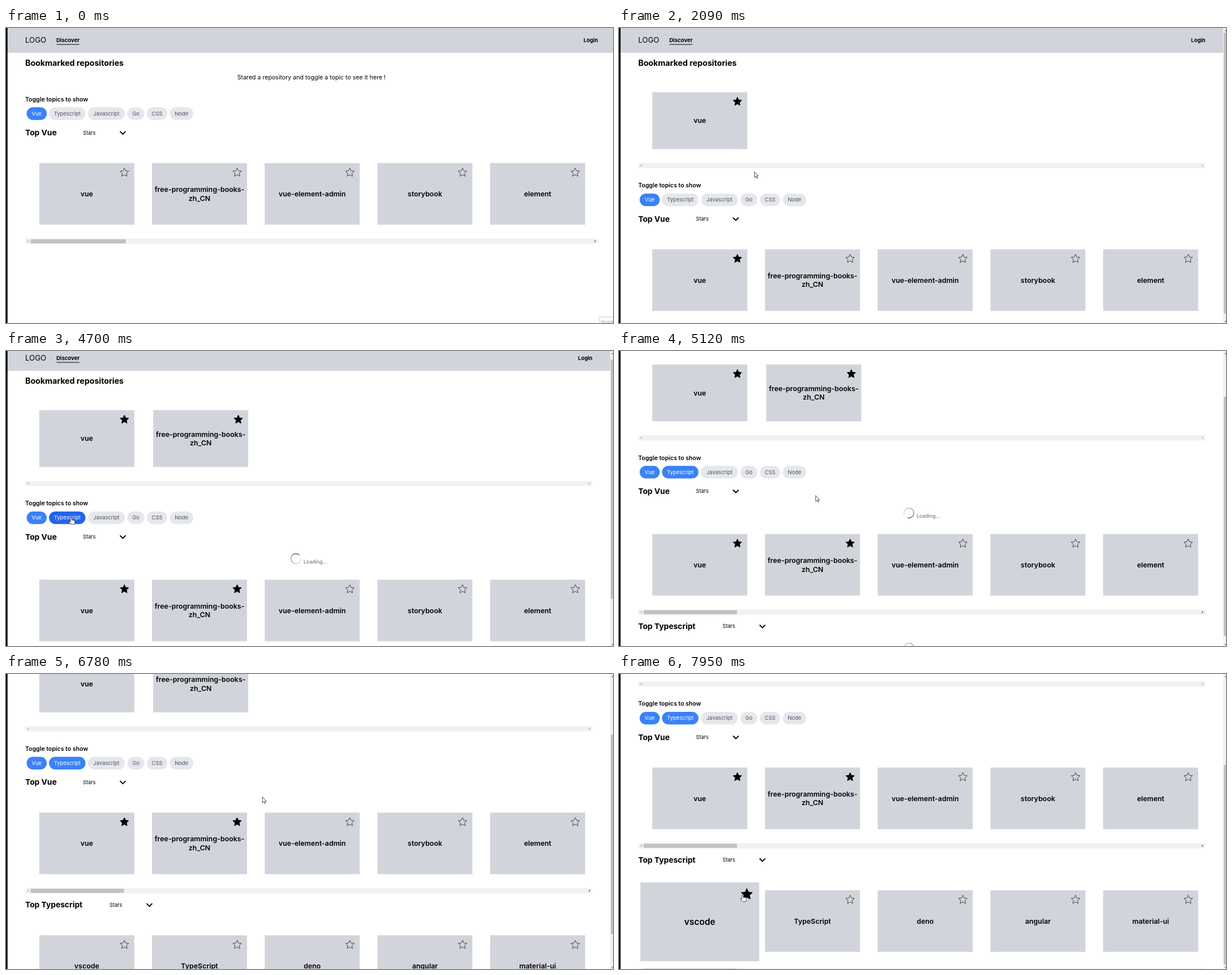
Recreate the animation shown at these times as an HTML page. Size 1073 px wide and 522 px high, loop 8000 ms.

```html
<!DOCTYPE html>
<html lang="en">
<head>
<meta charset="utf-8">
<title>Bookmarked repositories</title>
<style>
  html, body { margin: 0; width: 100%; height: 100%; overflow: hidden; background: #fff; }
  svg { display: block; width: 1073px; height: 522px; font-family: Inter, "Open Sans", sans-serif; }
</style>
</head>
<body>
<svg id="stage" viewBox="0 0 1073 522" xmlns="http://www.w3.org/2000/svg"></svg>
<script>
const LOOP = 8000;
const VIEW = 522;
const stage = document.getElementById('stage');

// Moments at which the page changes state
const STAR_VUE = 1830, STAR_BOOKS = 2860, PICK_TOPIC = 4630, LOADED = 6310, STAR_CODE = 7680;

const SCROLL = [[3560, 0], [3700, 9], [4930, 9], [5150, 102], [6650, 102], [6780, 146], [6990, 226]];
const POINTER = [
  [330, 652, 508], [600, 540, 400], [850, 400, 262], [970, 328, 178], [1080, 301, 185],
  [1140, 290, 203], [1210, 271, 226], [1350, 271, 226], [1520, 225, 246], [1650, 216, 252],
  [1850, 222, 251], [2090, 239, 254], [2160, 239, 254], [2400, 330, 330], [2600, 395, 392],
  [2800, 412, 396], [2990, 412, 395], [3060, 418, 396], [3200, 418, 396], [3330, 405, 320],
  [3470, 381, 205], [3600, 330, 232], [3900, 130, 290], [4020, 113, 294], [4700, 113, 294],
  [5000, 300, 270], [5400, 456, 222], [5890, 456, 222], [6240, 453, 217], [6780, 453, 217],
  [7000, 400, 260], [7250, 260, 370], [7480, 212, 388], [7560, 212, 388], [7750, 208, 392], [7950, 217, 390]
];
const HAND_TIMES = [[820, 940], [1520, STAR_VUE], [2580, 3260], [3440, 3540], [4000, 4850], [7210, LOOP]];

const VUE_REPOS = [['vue'], ['free-programming-books-', 'zh_CN'], ['vue-element-admin'], ['storybook'], ['element']];
const TS_REPOS = [['vscode'], ['TypeScript'], ['deno'], ['angular'], ['material-ui']];
const TOPICS = [['Vue', 36.5, 35.5], ['Typescript', 76, 64.5], ['Javascript', 145, 65],
  ['Go', 214.5, 30], ['CSS', 249, 36], ['Node', 289.5, 41.5]];

const clamp = v => Math.max(0, Math.min(1, v));
const ease = v => { v = clamp(v); return v * v * (3 - 2 * v); };

// Linear interpolation through [time, ...values]
function track(keys, t) {
  const i = keys.findIndex(k => k[0] > t);
  if (i === 0) return keys[0].slice(1);
  if (i < 0) return keys[keys.length - 1].slice(1);
  const a = keys[i - 1], b = keys[i], p = (t - a[0]) / (b[0] - a[0]);
  return a.slice(1).map((v, n) => v + (b[n + 1] - v) * p);
}

const hover = (t, from, to) => Math.min(ease((t - from) / 150), 1 - ease((t - to) / 150));

const rect = (x, y, w, h, fill, rx = 0) =>
  `<rect x="${x}" y="${y}" width="${w}" height="${h}" rx="${rx}" fill="${fill}"/>`;

// Text is placed by its vertical centre
const text = (s, x, cy, size, { weight = 400, fill = '#000', anchor = 'start' } = {}) =>
  `<text x="${x}" y="${cy + size * 0.36}" font-size="${size}" font-weight="${weight}" fill="${fill}" text-anchor="${anchor}">${s}</text>`;

const STAR_POINTS = Array.from({ length: 10 }, (_, i) => {
  const a = i * Math.PI / 5 - Math.PI / 2, r = i % 2 ? 3.9 : 8;
  return `${(r * Math.cos(a)).toFixed(2)},${(r * Math.sin(a)).toFixed(2)}`;
}).join(' ');

const star = (x, y, filled) =>
  `<polygon points="${STAR_POINTS}" transform="translate(${x} ${y})" fill="${filled ? '#000' : 'none'}" stroke="${filled ? '#000' : '#333'}" stroke-width="0.9" stroke-linejoin="round"/>`;

function card(lines, x, y, h, filled, grow = 0) {
  const scale = 1 + 0.25 * grow;
  const tall = h + 2.6 * grow;
  const cy = y + h / 2 + 1.4 * grow;
  const label = lines.map((s, i) =>
    text(s, 0, (i - (lines.length - 1) / 2) * 15.6, 12.4, { weight: 600, anchor: 'middle' })).join('');
  return `<g transform="translate(${x + 84} ${cy}) scale(${scale})">` +
    rect(-84, -tall / 2, 168, tall, '#d1d5db') + star(66.5, 16.8 - tall / 2, filled) + label + '</g>';
}

function cardRow(repos, y, filled, grow) {
  const order = repos.map((_, i) => i).sort((a, b) => (grow[a] || 0) - (grow[b] || 0));
  return order.map(i => card(repos[i], 58.8 + i * 199.25, y, 109, filled[i], grow[i])).join('');
}

function scrollbar(y, right, thumb) {
  const cy = y + 4.6, end = thumb ? '#404040' : '#a3a3a3';
  return rect(34, y, right - 34, 9.3, '#f1f1f1') +
    (thumb ? rect(43.5, y + 1, thumb, 7.3, '#c1c1c1') : '') +
    `<path d="M40 ${cy - 2}v4l-2.3-2z" fill="#a3a3a3"/>` +
    `<path d="M${right - 6} ${cy - 2}v4l2.3-2z" fill="${end}"/>`;
}

function heading(topic, cy, shift) {
  const x = 206.5 + shift;
  return text('Top ' + topic, 34, cy, 13.8, { weight: 700 }) +
    text('Stars', 136 + shift, cy, 9.2) +
    `<path d="M${x - 5} ${cy - 2.3}l5 5l5-5" fill="none" stroke="#000" stroke-width="1.9"/>`;
}

function loading(cy, t) {
  const turn = (t - 5890) * 0.36 + 20;
  let arcs = '';
  for (let i = 0; i < 8; i++) {
    const a = -i * 45;
    arcs += `<path d="M8.8 0A8.8 8.8 0 0 0 6.22 -6.22" transform="rotate(${a})" stroke-opacity="${0.85 - i * 0.1}" stroke-width="${1.5 - i * 0.1}"/>`;
  }
  return `<g transform="translate(512.5 ${cy - 5.5}) rotate(${turn})" fill="none" stroke="#444">${arcs}</g>` +
    text('Loading...', 526, cy, 8.9, { fill: '#666' });
}

function topicPills(cy, t) {
  const lit = ease((t - 4050) / 200) * (1 - ease((t - 4850) / 150));
  const mix = (a, b) => `rgb(${a.map((v, i) => Math.round(v + (b[i] - v) * lit))})`;
  return TOPICS.map(([name, x, w], i) => {
    const active = i === 0 || (i === 1 && t >= PICK_TOPIC);
    let fill = active ? '#3b82f6' : '#e5e7eb';
    if (i === 1) fill = active ? mix([59, 130, 246], [37, 99, 235]) : mix([229, 231, 235], [209, 213, 219]);
    return rect(x, cy - 11.2, w, 22.4, fill, 11.2) +
      text(name, x + w / 2, cy, 9.4, { fill: active ? '#fff' : '#4b5563', anchor: 'middle' });
  }).join('');
}

function header(right) {
  return rect(0, 0, right, 44, '#d1d5db') +
    text('LOGO', 34, 21.5, 13.2) +
    text('Discover', 89, 21.3, 9.5, { weight: 700 }) +
    rect(89.3, 28.6, 40.5, 1, '#000') +
    text('Login', right < 1073 ? 1036.7 : 1046.3, 21.3, 9.4, { weight: 700, anchor: 'end' });
}

function bookmarks(t) {
  if (t < STAR_VUE) {
    return text('Stared a repository and toggle a topic to see it here !', 540, 87.5, 10.6, { anchor: 'middle' });
  }
  const [grow] = track([[3455, 0], [3470, 0.04], [3540, 0.2], [3640, 0]], t);
  return card(VUE_REPOS[0], 58.8, 113.6, 100.7, true) +
    (t >= STAR_BOOKS ? card(VUE_REPOS[1], 260.2, 113.6, 100.7, true, grow) : '') +
    scrollbar(238.8, 1036.5, 0);
}

function page(t) {
  const starred = t >= STAR_VUE;
  const busy = t >= PICK_TOPIC && t < LOADED;
  const top = starred ? 152.6 : 0;
  const gap = busy ? 22 : 0;
  const right = starred ? 1036.5 : 1046.5;
  const thumb = starred ? 165 : 168.5;
  const [brush] = track([[850, 0], [920, 0.03], [1000, 0]], t);
  const grow = [hover(t, 1520, STAR_VUE), Math.max(brush, hover(t, 2570, 3250))];

  let out = header(starred ? 1068 : 1073) +
    text('Bookmarked repositories', 34, 62, 14.2, { weight: 700 }) +
    bookmarks(t) +
    text('Toggle topics to show', 34, top + 126, 10.5, { weight: 600 }) +
    topicPills(top + 151.5, t) +
    heading('Vue', top + 185.2, 0) +
    scrollbar(top + gap + 372.7, right, thumb) +
    cardRow(VUE_REPOS, top + gap + 239, [starred, t >= STAR_BOOKS], grow);

  if (busy) {
    out += loading(382, t) + heading('Typescript', 576.7, 47) + loading(621, t);
  } else if (t >= LOADED) {
    out += heading('Typescript', 554.8, 47) + scrollbar(746.3, right, thumb) +
      cardRow(TS_REPOS, 608.7, [t >= STAR_CODE], [hover(t, 7210, LOOP + 500)]);
  }
  return out;
}

function pageScrollbar(t, scroll) {
  if (t < STAR_VUE) return '';
  const height = t < PICK_TOPIC ? 531 : t < LOADED ? 624 : 748;
  const ratio = 506 / height;
  return rect(1068, 0, 5, VIEW, '#f1f1f1') +
    rect(1069, 8 + scroll * ratio, 4, VIEW * ratio, '#c1c1c1') +
    '<path d="M1070.5 5.5L1073 3v2.5z" fill="#505050"/><path d="M1070.5 518.5L1073 521v-2.5z" fill="#505050"/>';
}

function pointer(t) {
  if (t < 330) return '';
  const [x, y] = track(POINTER, t);
  const hand = HAND_TIMES.some(([a, b]) => t >= a && t < b);
  const shape = hand
    ? 'M-1.2 1Q0-.6 1.2 1V5L2.6 4.8 4 5.2 5.4 5.5 6.8 6.5V9.2L5.5 12.5H-.5L-4 8.2Q-4.2 6.7-2.8 7L-1.2 8.4z'
    : 'M0 0V10.2L2.3 8.2 3.9 11.8 5.5 11.1 4 7.5H7z';
  return `<path d="${shape}" transform="translate(${x + (hand ? 1.5 : 0.5)} ${y + 0.3})" fill="#fff" stroke="#222" stroke-width="0.8" stroke-linejoin="round"/>`;
}

function recordTab(t) {
  return t < 70
    ? '<rect x="1049.5" y="511.5" width="30" height="16" fill="#fff" stroke="#c8c8c8"/>' +
      text('Record', 1052, 519.5, 6.2, { fill: '#999' })
    : '';
}

function render(t) {
  const [scroll] = track(SCROLL, t);
  stage.innerHTML = rect(0, 0, 1073, VIEW, '#fff') +
    `<g transform="translate(0 ${-scroll})">${page(t)}</g>` +
    rect(0, 0, 2.7, VIEW, '#000') +
    pageScrollbar(t, scroll) + recordTab(t) + pointer(t);
}

const start = performance.now();
function tick() {
  render((performance.now() - start) % LOOP);
  requestAnimationFrame(tick);
}
tick();
</script>
</body>
</html>
```
